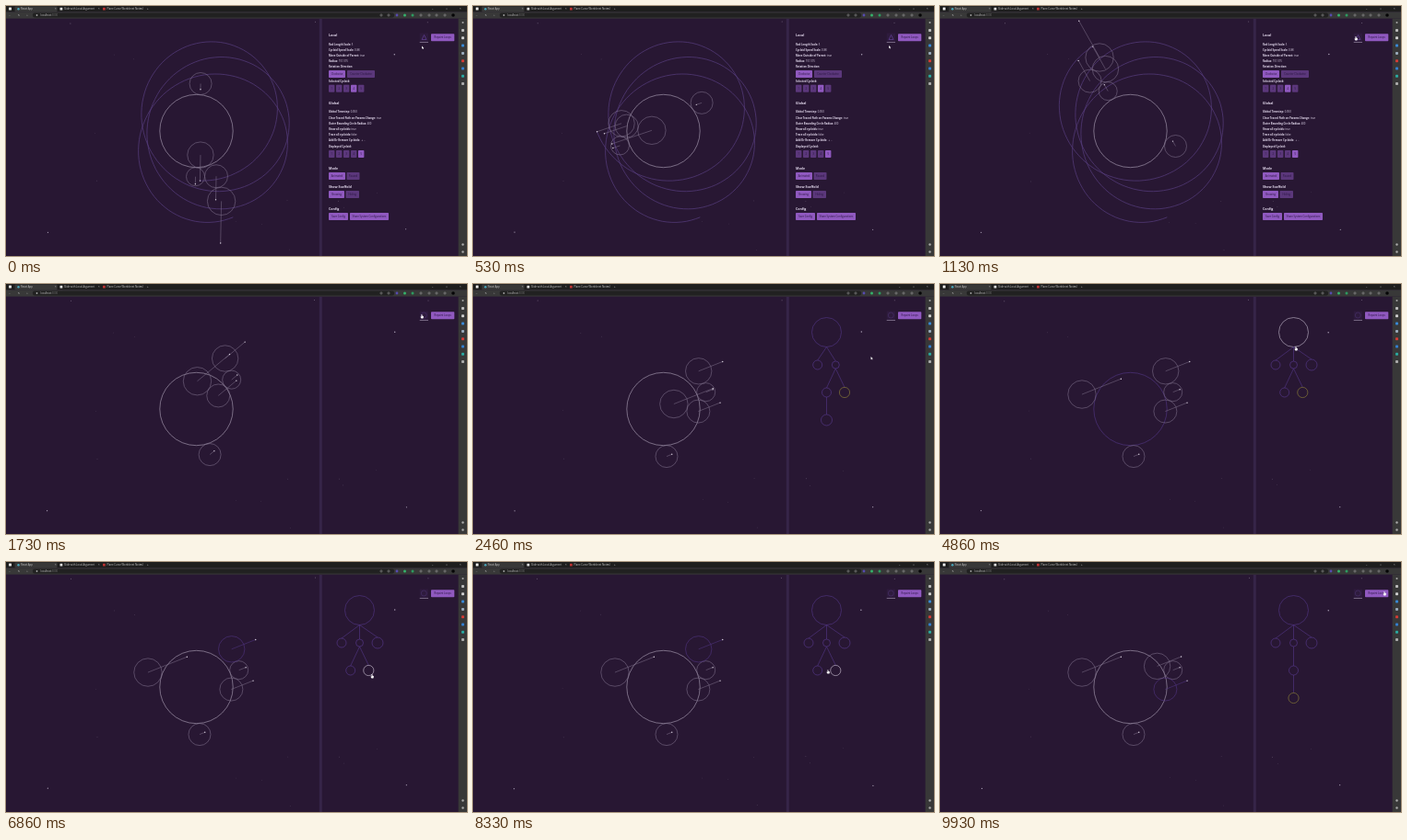
Recreate the animation shown at these times as an HTML page. Size 500 by 272 pixels, loop 10 s.

```html
<!DOCTYPE html>
<html>
<head>
<meta charset="utf-8">
<style>
  html, body { margin: 0; width: 100%; height: 100%; overflow: hidden; background: #281733; }
  svg { display: block; width: 500px; height: 272px; }
  text { font: 2.75px "Open Sans", sans-serif; fill: #e6dcf0; }
  .b { font-weight: 700; }
  .h { font-size: 3.6px; font-weight: 700; }
  .dark { fill: #2b1740; }
  .bar { fill: #c8c8c8; }
</style>
</head>
<body>
<svg viewBox="0 0 500 272">
  <rect width="500" height="272" fill="#281733"/>
  <g id="stars"></g>
  <path d="M341.3 14V272" stroke="#362548" stroke-width="3"/>
  <path id="trace" fill="none" stroke="#583e80" stroke-width=".7"/>
  <g id="rig" fill="none"></g>
  <g id="panel"></g>
  <g id="tree" fill="none"></g>
  <g id="corner"></g>
  <g id="chrome"></g>
  <path id="arrow" d="M0 0V3.2L.8 2.5L1.3 3.5L1.9 3.3L1.4 2.3H2.4Z" fill="#eee"/>
  <path id="hand" d="M-.5-1.7Q0-2.2.4-1.7V-.4L1.7 0Q2 .4 1.7 1.7L1.3 2.4H-.5L-1.6.7Q-1.3.2-.5.6Z" fill="#fff"/>
</svg>
<script>
const $ = id => document.getElementById(id);
const LOOP = 10000, RAD = Math.PI / 180;
const PANEL_END = 1400, SPIN_END = 1868, FIRST_DROP = 4700, SECOND_DROP = 8800;
const PURPLE = '#55388a';

const text = (x, y, s, cls = '') => `<text x="${x}" y="${y}" class="${cls}">${s}</text>`;
const rect = (x, y, w, h, fill, r = 0) =>
  `<rect x="${x}" y="${y}" width="${w}" height="${h}" rx="${r}" fill="${fill}"/>`;
const ring = ([x, y], r, color, w) =>
  `<circle cx="${x}" cy="${y}" r="${r}" stroke="${color}" stroke-width="${w}"/>`;
const line = ([x, y], [u, v], color, w) =>
  `<path d="M${x} ${y}L${u} ${v}" stroke="${color}" stroke-width="${w}"/>`;
const dot = (x, y, r, fill) => `<circle cx="${x}" cy="${y}" r="${r}" fill="${fill}"/>`;
const polar = ([x, y], r, deg) => [x + r * Math.cos(deg * RAD), y + r * Math.sin(deg * RAD)];

// Settings panel
function button(x, y, w, label, on) {
  return rect(x, y, w, 8, on ? '#9059c0' : '#5b377b', .8) +
    `<text x="${x + w / 2}" y="${y + 5}" text-anchor="middle" class="dark">${label}</text>`;
}
const numbers = (y, on) =>
  [0, 1, 2, 3, 4].map(i => button(350 + 8 * i, y, 6.4, i + 1, i === on)).join('');
function labels(y, rows) {
  return rows.map((row, i) => {
    const [key, value] = row.split('|');
    return `<text x="350" y="${y + i * 6.2}"><tspan class="b">${key}</tspan>${value || ''}</text>`;
  }).join('');
}
$('panel').innerHTML =
  text(350, 32.8, 'Local', 'h') +
  labels(42.5, ['Rod Length Scale:| 5', 'Cycloid Speed Scale:| 0.88', 'Move Outside of Parent:| true',
    'Radius:| 151.515', 'Rotation Direction:']) +
  button(350, 70, 18, 'Clockwise', true) + button(370, 70, 30, 'Counter Clockwise') +
  text(350, 83, 'Selected Cycloid:', 'b') + numbers(85.7, 3) +
  text(350, 106.7, 'Global', 'h') +
  labels(116.3, ['Global Timestep:| 0.050', 'Clear Traced Path on Params Change:| true',
    'Outer Bounding Circle Radius:| 400', 'Show all cycloids:| true', 'Trace all cycloids:| false',
    'Add Or Remove Cycloids:|&#160; + &#160;-', 'Displayed Cycloid:']) +
  numbers(157, 4) +
  text(350, 178.4, 'Mode', 'h') +
  button(350, 181, 18, 'Animated', true) + button(369.5, 181, 14, 'Paused') +
  text(350, 198.4, 'Show Scaffold', 'h') +
  button(350, 201, 17, 'Showing', true) + button(368.5, 201, 14.5, 'Hiding') +
  text(350, 222.4, 'Config', 'h') +
  button(350, 225, 21, 'Save Config', true) + button(373, 225, 42, 'Share System Configurations', true);

// Browser frame
$('chrome').innerHTML =
  rect(0, 0, 500, 6.4, '#1e1e1e') + rect(0, 6.4, 500, 7.2, '#383838') +
  rect(9.5, .6, 46, 6, '#383838', 1) + rect(29, 7.6, 392, 4.8, '#212121', 2) +
  rect(490.6, 13.6, 9.4, 258.4, '#383838') +
  rect(3, 1.6, 3, 3, '#ddd', .5) + dot(13.5, 3.3, 1.2, '#4aa9bd') +
  rect(58.5, 1.8, 2.8, 2.8, '#ddd', .3) + rect(105, 1.8, 2.8, 2.8, '#b33', .3) +
  text(16, 4.2, 'React App', 'bar') + text(63, 4.2, 'Slide with Local Argument', 'bar') +
  text(109.5, 4.2, 'Plane Curve Worksheet Notes (', 'bar') +
  [53, 100, 146].map(x => text(x, 4.2, '×', 'bar')).join('') + text(153, 4.2, '+', 'bar') +
  text(3, 11, '←', 'bar') + text(13, 11, '↻', 'bar') + text(22, 11, '⌂', 'bar') +
  dot(33.5, 10, .9, '#aaa') + text(37.5, 11, 'localhost:<tspan fill="#777">3000</tspan>', 'bar') +
  [407, 415, 450, 459, 467, 476].map(x =>
    `<circle cx="${x}" cy="10" r="1.1" fill="none" stroke="#aaa" stroke-width=".5"/>`).join('') +
  dot(424, 10, 1.4, '#574bb0') + dot(432.5, 10, 1.5, '#35b36b') + dot(441, 10, 1.5, '#2d9b60') +
  dot(485, 10, 1.8, '#050506') +
  text(462, 4, '–', 'bar') + text(477, 4, '□', 'bar') + text(492, 4, '×', 'bar') +
  ['#bbb', '#ccc', '#3989d6', '#9ab', '#d33b35', '#347fd0', '#2aa9a0', '#aaa'].map((c, i) =>
    rect(494, 25 + i * 8.3, 3, 3, c, .8)).join('') +
  dot(495.5, 18, 1, '#aaa') + dot(495.5, 259.5, 1.2, '#aaa') + dot(495.5, 267.5, 1.2, '#aaa');

// Rolling circles: radius, rod length, start angle, angle per unit of spin, tree radius
const CENTER = [206.5, 136];
const parts = {
  root: { r: 39.7, tree: 16 },
  A: { r: 12, rod: 6.2, start: -85, rate: .692, tree: 5 },
  C: { r: 10, rod: 8, start: 91, rate: 1, tree: 4 },
  X: { r: 12.5, rod: 25.5, start: -1, rate: -1, tree: 5 },
  B: { r: 14.2, rod: 28, start: -77, rate: -.1304, tree: 5.6 },
  E: { r: 15.2, rod: 45.6, start: 78.5, rate: -.977, tree: 6 }
};
const parents = [
  { A: 'root', C: 'root', X: 'C', B: 'C', E: 'X' },
  { A: 'root', C: 'root', X: 'C', B: 'C', E: 'root' },
  { A: 'root', C: 'root', X: 'C', B: 'X', E: 'root' }
];
const ROOT_SPOT = [383.5, 52.5];
const spots = [
  { A: [373.7, 88], C: [393.3, 88], X: [383.5, 118], B: [403, 118], E: [383.5, 148] },
  { A: [364, 88], C: [383.5, 88], X: [373.7, 118], B: [393.3, 118], E: [403, 88] },
  { A: [364, 88], C: [383.5, 88], X: [383.5, 118], B: [383.5, 148], E: [403, 88] }
];

function place(name, spin, links) {
  if (name === 'root') return CENTER;
  const p = parts[name], up = links[name];
  return polar(place(up, spin, links), p.r + parts[up].r, p.start + p.rate * (spin - 91));
}

function drawRig(spin, links, hovered) {
  const color = name => hovered.includes(name) ? PURPLE : name === 'root' ? '#b3a7bd' : '#83748f';
  let out = ring(CENTER, parts.root.r, color('root'), .6);
  for (const name in links) {
    const c = place(name, spin, links), tip = polar(c, parts[name].rod, spin);
    out += ring(c, parts[name].r, color(name), .55) + line(c, tip, color(name), .5) +
      dot(...tip, .7, '#d8d0de');
  }
  $('rig').innerHTML = out;
}

function drawTrace(spin) {
  const points = [];
  for (let a = -1013; a < spin + 4; a += 4) {
    const s = Math.min(a, spin);
    points.push(polar(place('B', s, parents[0]), parts.B.rod, s).map(v => v.toFixed(1)));
  }
  $('trace').setAttribute('d', 'M' + points.join('L'));
}

// Links run from the bottom of a parent to the top of its child.
function drawTree(state, hovered) {
  const at = name => name === 'root' ? ROOT_SPOT : spots[state][name];
  const color = name => hovered.includes(name) ? '#c4bacd' : name === 'B' ? '#8a7d36' : PURPLE;
  let out = ring(ROOT_SPOT, parts.root.tree, color('root'), .6);
  for (const name in spots[state]) {
    const up = parents[state][name], spot = at(name), r = parts[name].tree;
    out += line(polar(at(up), parts[up].tree, 90), polar(spot, r, -90), PURPLE, .6) +
      ring(spot, r, color(name), .65);
  }
  $('tree').innerHTML = out;
}

function hoveredAt(t) {
  const spans = [['E', 2950, FIRST_DROP], ['root', 3900, 5100], ['B', 6300, SECOND_DROP],
    ['C', 7500, 8000], ['X', 8400, LOOP]];
  return spans.filter(([, from, to]) => t >= from && t < to).map(s => s[0]);
}

function drawCorner(t) {
  const icon = t < PANEL_END
    ? '<path d="M453.5 31.5L451 36.5M453.5 31.5L456 36.5M451 36.5H456" stroke="#6a45a4" stroke-width=".6"/>'
    : '<circle cx="453.3" cy="34" r="3" fill="none" stroke="#4a3170" stroke-width=".6"/>';
  $('corner').innerHTML = rect(448.7, 29.5, 9.3, 9.5, '#2e1b3d') + icon +
    rect(448.7, 39, 9.3, .6, '#a598b2') + button(461, 30.3, 25.3, 'Repaint Loops', true);
}

// Cursor stops: time, x, y
const stops = [[0, 451, 43.5], [450, 451, 43.5], [950, 451, 35], [2060, 451, 35], [2400, 431.5, 79],
  [2500, 431.5, 79], [3000, 385, 149], [3400, 385, 149], [4200, 386, 70], [4900, 386, 70],
  [5600, 400, 98], [6500, 397, 124], [7200, 397, 124], [7700, 385, 90], [8400, 385, 120],
  [8900, 385, 120], [9800, 482, 34], [LOOP, 482, 34]];

function drawCursor(t) {
  const i = stops.findIndex(s => s[0] > t), [t0, x0, y0] = stops[i - 1], [t1, x1, y1] = stops[i];
  const k = (t - t0) / (t1 - t0), e = k * k * (3 - 2 * k);
  const move = `translate(${x0 + (x1 - x0) * e} ${y0 + (y1 - y0) * e})`;
  const pointing = [[700, 2150], [2950, 4900], [6300, 9000], [9600, LOOP]]
    .some(([from, to]) => t >= from && t < to);
  for (const id of ['arrow', 'hand']) {
    $(id).setAttribute('transform', move);
    $(id).style.display = (id === 'hand') === pointing ? '' : 'none';
  }
}

const stars = [[421.3, 52.4, .75], [45, 246.5, .65], [434, 243, .6], [70, 18.5, .5], [335, 17.3, .5],
  [457.5, 18, .5], [139, 57.5, .3], [117, 53, .3], [98.5, 190.5, .35], [361, 212, .4], [366, 219, .3],
  [305, 212, .3], [97, 138, .25], [277, 237, .25], [249, 235, .25], [308, 265, .3], [402, 203, .25]];

function drawStars(t) {
  $('stars').innerHTML = stars.map(([x, y, r], i) => {
    const a = t / LOOP * 2 * Math.PI * (2 + i % 3) + i * 2;
    return dot(x + .5 * Math.sin(a), y + .4 * Math.cos(a), r, i < 3 ? '#a99eb4' : '#75677f');
  }).join('');
}

const start = performance.now();
function frame() {
  const t = (performance.now() - start) % LOOP;
  const spin = 91 + .1324 * Math.min(t, SPIN_END);
  const state = t < FIRST_DROP ? 0 : t < SECOND_DROP ? 1 : 2;
  const hovered = hoveredAt(t), open = t < PANEL_END;
  $('panel').style.display = $('trace').style.display = open ? '' : 'none';
  $('tree').style.display = t < SPIN_END ? 'none' : '';
  if (open) drawTrace(spin);
  drawStars(t);
  drawRig(spin, parents[state], hovered);
  // The tree highlight ends with the drop; the circle itself stays tinted.
  drawTree(state, state === 2 ? [] : hovered);
  drawCorner(t);
  drawCursor(t);
  requestAnimationFrame(frame);
}
frame();
</script>
</body>
</html>
```
